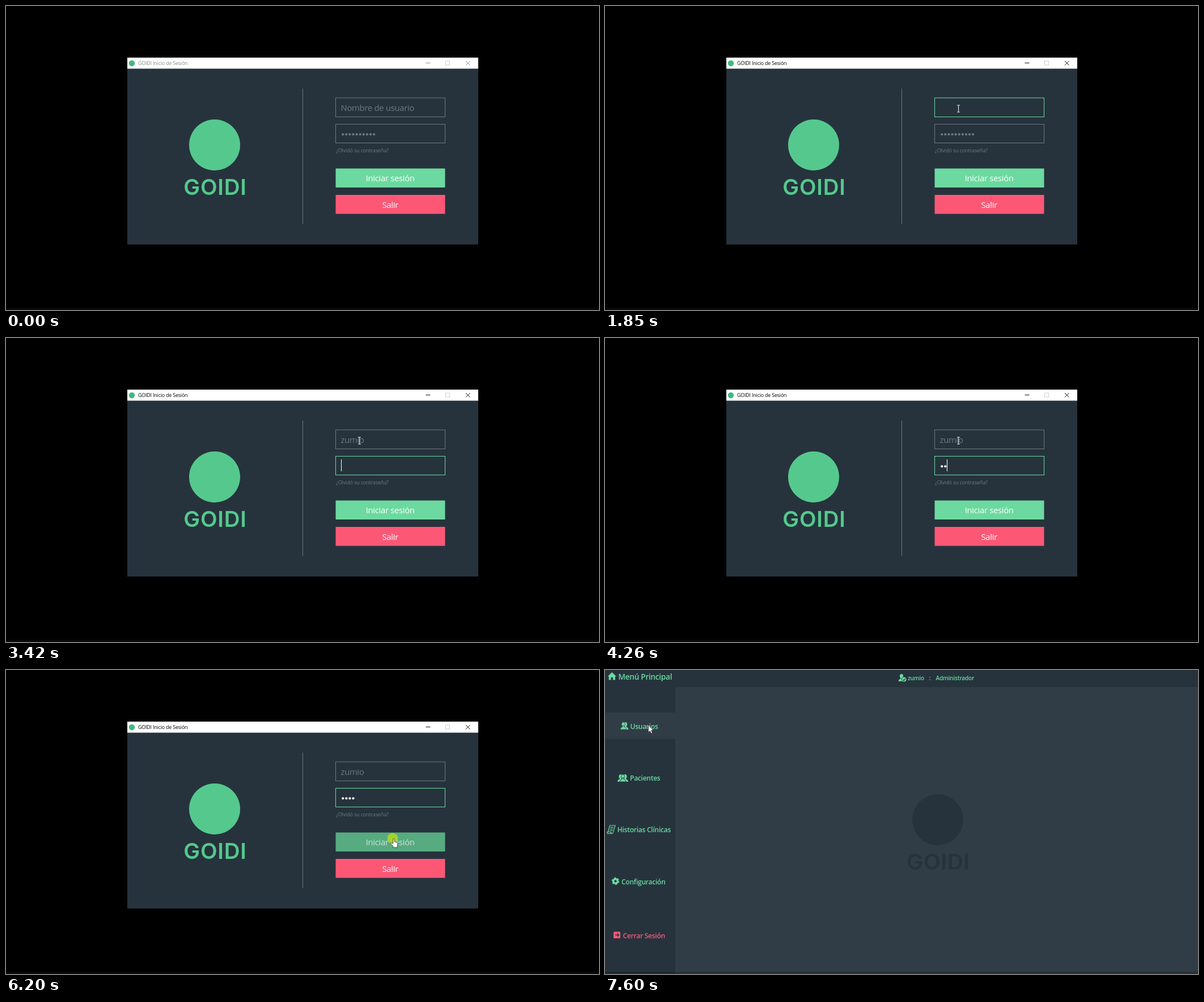
Recreate the animation shown at these times as an HTML page. Size 1046x536 px, loop 8000 ms.

```html
<!DOCTYPE html>
<html lang="es">
<head>
<meta charset="utf-8">
<title>GOIDI Inicio de Sesión</title>
<style>
  html, body { margin: 0; width: 100%; height: 100%; overflow: hidden; background: #000; }
  svg { display: block; width: 100%; height: 100%; }
  text { font-family: "Open Sans", "Noto Sans", sans-serif; letter-spacing: -.02em; white-space: pre; }
  .input { font-size: 14.85px; }
  .button { font-size: 14.8px; text-anchor: middle; fill: #fff; }
  .brand { font: 600 38.5px Inter, sans-serif; letter-spacing: .02em; text-anchor: middle; }
  .menu text { font-weight: 600; font-size: 12px; }
  .box { fill: none; stroke-width: 1; }
</style>
</head>
<body>
<svg viewBox="0 0 1046 536" preserveAspectRatio="none">
  <defs>
    <g id="logo">
      <circle cx="368" cy="245" r="45"/>
      <text class="brand" x="369" y="333">GOIDI</text>
    </g>
    <g id="person">
      <ellipse cx="5" cy="3.8" rx="3.1" ry="3.8"/>
      <path d="M3.6 6H6.4V8.3Q10 9 10.4 13H-.4Q0 9 3.6 8.3Z"/>
    </g>
  </defs>

  <g id="login">
    <rect width="1046" height="536"/>
    <rect x="214" y="91" width="619" height="329.5" fill="#26333d"/>
    <rect x="214" y="91" width="619" height="19.5" fill="#fff"/>
    <circle cx="222" cy="101" r="5.2" fill="#3dbb7c"/>
    <text id="title" x="233" y="104" font-size="8.9">GOIDI Inicio de Sesión</text>
    <path id="controls" d="M740.5 100.5H748.5M811 97L818.5 104.5M818.5 97L811 104.5" fill="none"/>
    <rect class="box" x="775.5" y="97" width="7" height="7" stroke="#d0d0d0"/>
    <path d="M523.5 145.5V384" stroke="#6c767c"/>
    <use href="#logo" fill="#3dbb7c" id="mark"/>

    <rect id="userBox" class="box" x="581.5" y="162" width="193" height="33.5"/>
    <text id="user" class="input" x="590.5" y="185"></text>
    <rect id="passBox" class="box" x="581.5" y="208.5" width="193" height="33"/>
    <g id="dots"></g>
    <rect id="caret" width="1" height="21" fill="#fff"/>
    <text x="582" y="257.5" font-size="9.07" fill="#6f787e">¿Olvidó su contraseña?</text>

    <rect id="enter" x="581.5" y="286.5" width="193" height="33.5"/>
    <text id="enterText" class="button" x="677.7" y="309">Iniciar sesión</text>
    <rect x="581.5" y="333" width="193" height="33.5" fill="#fd5776"/>
    <text class="button" x="677.7" y="355.5">Salir</text>
  </g>

  <g id="main" class="menu" fill="#6cd9a0">
    <rect width="1046" height="536" fill="#26333d"/>
    <rect x="124" y="30" width="922" height="506" fill="#303d46"/>
    <rect id="hover" y="75" width="124" height="46.5" fill="#303d46"/>
    <use href="#logo" x="219" y="19" fill="#26333d"/>

    <path d="M12.3 4L20 11.2H18V17.5H14V13H10.6V17.5H6.7V11.2H4.7Z"/>
    <text x="23.5" y="17" style="font-size:13.6px">Menú Principal</text>

    <use href="#person" x="518" y="7"/>
    <circle cx="527.5" cy="16.7" r="4.4" stroke="#26333d" stroke-width=".8"/>
    <path d="M525.3 16.8L527 18.5 529.8 15.3" fill="none" stroke="#26333d" stroke-width="1.2"/>
    <g transform="translate(0 18)">
      <text x="534" style="font-size:10.1px">zumio</text>
      <text x="571.5" style="font-size:10.1px">:</text>
      <text x="583.5" style="font-size:10.1px">Administrador</text>
    </g>

    <use href="#person" x="31" y="92"/>
    <use href="#person" x="27.3" y="92" stroke="#26333d" stroke-width=".6"/>
    <text x="44.5" y="104">Usuarios</text>

    <use href="#person" x="22.5" y="184"/>
    <use href="#person" x="30.5" y="184"/>
    <use href="#person" x="26.5" y="184" stroke="#26333d" stroke-width=".8"/>
    <text x="44" y="195">Pacientes</text>

    <path d="M8.5 274H18L14 287Q13.4 288.3 12 288.3H5Q3.2 288 4 285.5H10.5Q10 288 12 288.3M5.5 285L8.5 274M9.8 277.4H14.8M9 280H14M8.2 282.6H13.2" fill="none" stroke="#6cd9a0" stroke-width="1.2"/>
    <text x="21.7" y="286">Historias Clínicas</text>

    <circle cx="18.5" cy="372.3" r="3.8" fill="none" stroke="#6cd9a0" stroke-width="3.4"/>
    <circle cx="18.5" cy="372.3" r="5.7" fill="none" stroke="#6cd9a0" stroke-width="2" stroke-dasharray="2.98"/>
    <text x="29" y="377.5">Configuración</text>

    <g fill="#fd5776">
      <rect x="15" y="461.5" width="12" height="11.5" rx="1"/>
      <path d="M18 467.3H24M21.7 464.6L24.5 467.3 21.7 470" fill="none" stroke="#26333d" stroke-width="1.4"/>
      <text x="31.5" y="472.5">Cerrar Sesión</text>
    </g>
  </g>

  <rect y="532" width="1046" height="4" fill="#1c1820" opacity=".35"/>
  <circle id="click" r="9.5" fill="#b4dc1e" opacity=".82"/>
  <g id="pointer">
    <path id="ibeam" d="M-1 -5.5H1L1.5 -5 2 -5.5H4M1.5 -5V6M-1 6.5H1L1.5 6 2 6.5H4" fill="none" stroke="#e6e9eb" stroke-width="1.1"/>
    <path id="hand" d="M.8 9V1.6Q.8 .2 2 .2T3.3 1.6V5.8L8 7Q9 7.3 9 8.5L8.2 13V16H.8V13.5L-3.4 9Q-3.8 7.4 -2.2 7.6Z" fill="#fff" stroke="#222" stroke-width=".8"/>
    <path id="arrow" d="M.5 0V13L3.4 10.2 5.3 14.7 7.4 13.8 5.5 9.4H9Z" fill="#fff" stroke="#222" stroke-width=".6"/>
  </g>
</svg>
<script>
const LOOP = 8000, NAME = "zumio";
const GREEN = "#6cd9a0", GRAY = "#6f787e";
const LOGIN_END = 6430, FOCUS_USER = 1380, FOCUS_PASS = 3420;
const userKeys = [2080, 2410, 2710, 2940, 3090];
const passKeys = [4030, 4260, 4510, 4740];
const clicks = [[1380, 1620], [6200, 6430]];

// start, end, steps, from x, y, to x, y
const moves = [
  [360, 600, 4, 1058, 421, 701, 228.5],
  [830, 1220, 6, 701, 228.5, 622, 180.5],
  [5200, 6030, 12, 622, 180.5, 682, 297],
  [6910, 7140, 4, 682, 297, 109, 86],
  [7460, 7600, 3, 109, 86, 76, 97]
];

const $ = id => document.getElementById(id);
const set = (id, attrs) => { for (const k in attrs) $(id).setAttribute(k, attrs[k]); };
const show = (id, on) => set(id, { visibility: on ? "visible" : "hidden" });
const count = (times, t) => times.filter(k => t >= k).length;
const within = (v, a, b) => v >= a && v < b;
const smooth = p => p * p * (3 - 2 * p);

$("mark").setAttribute("fill", "#55c98d");
for (let i = 0; i < 10; i++) {
  const dot = document.createElementNS("http://www.w3.org/2000/svg", "circle");
  dot.setAttribute("cx", 594.2 + 6.1 * i);
  dot.setAttribute("cy", 226.3);
  dot.setAttribute("r", 2.1);
  $("dots").append(dot);
}

function pointerAt(t) {
  const move = moves.filter(m => t >= m[0]).pop();
  if (!move) return null;
  const [start, end, steps, x0, y0, x1, y1] = move;
  const step = Math.floor((t - start) / (end - start) * (steps - 1) + 1e-6) + 1;
  const p = smooth(Math.min(step, steps) / steps);
  return [x0 + (x1 - x0) * p, y0 + (y1 - y0) * p];
}

function pointerKind([x, y], login) {
  if (!login || !within(x, 581, 775)) return "arrow";
  if (within(y, 162, 196) || within(y, 208, 242)) return "ibeam";
  return within(y, 286, 320) || within(y, 333, 367) ? "hand" : "arrow";
}

function drawForm(t, kind) {
  const active = t >= FOCUS_USER, onPass = t >= FOCUS_PASS, onUser = active && !onPass;
  const typed = count(userKeys, t), secret = count(passKeys, t);

  set("title", { fill: active ? "#000" : "#7e9086" });
  set("controls", { stroke: active ? "#111" : "#8c8c8c" });
  set("userBox", { stroke: onUser ? GREEN : GRAY });
  set("passBox", { stroke: onPass ? GREEN : GRAY });
  set("user", { fill: onUser ? "#fff" : GRAY });
  $("user").textContent = active ? NAME.slice(0, typed) : "Nombre de usuario";

  const dots = onPass ? secret : 10;
  set("dots", { fill: onPass ? "#fff" : GRAY });
  [...$("dots").children].forEach((d, i) => d.setAttribute("display", i < dots ? "inline" : "none"));

  // The caret restarts its blink at each focus change or key press
  const last = [FOCUS_USER, ...userKeys, FOCUS_PASS, ...passKeys].filter(k => t >= k).pop();
  show("caret", active && (t - last) % 1000 < 460);
  set("caret", onPass
    ? { x: 591 + 6 * secret, y: 214 }
    : { x: typed && active ? 590.5 + $("user").getComputedTextLength() : 591, y: 168 });

  const over = kind === "hand";
  set("enter", { fill: over ? "#57ab80" : GREEN });
  $("enterText").style.fill = over ? "#d3e3da" : "#fff";
}

function draw(t) {
  const login = t < LOGIN_END, pos = pointerAt(t);
  const kind = pos && pointerKind(pos, login);
  set("login", { display: login ? "inline" : "none" });
  set("main", { display: login ? "none" : "inline" });
  if (login) drawForm(t, kind);
  else set("hover", { display: pos[0] < 124 && within(pos[1], 75, 122) ? "inline" : "none" });

  for (const id of ["ibeam", "hand", "arrow"]) show(id, id === kind);
  if (pos) {
    set("pointer", { transform: `translate(${pos})` });
    set("click", { cx: pos[0], cy: pos[1] });
  }
  show("click", clicks.some(([a, b]) => within(t, a, b)));
}

const began = performance.now();
function tick() {
  draw((performance.now() - began) % LOOP);
  requestAnimationFrame(tick);
}
tick();
</script>
</body>
</html>
```
